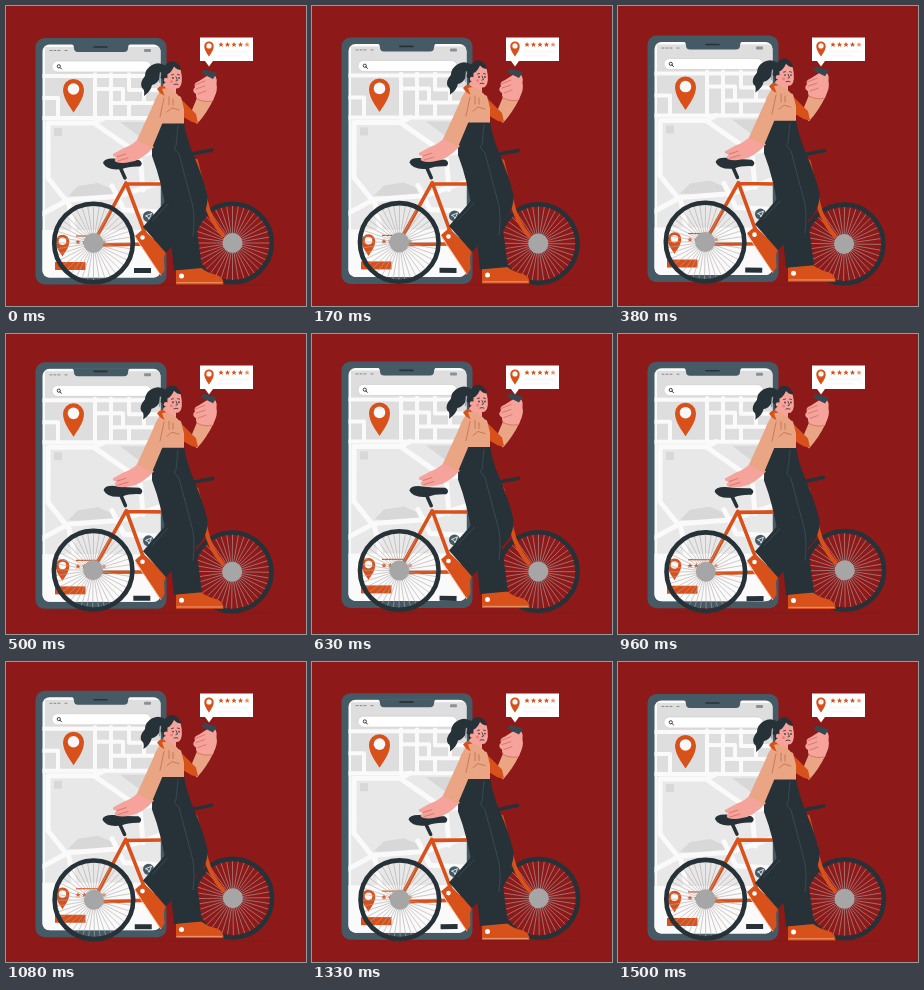
Write an HTML page that moves like this. It is 300 px wide and 300 px high and loops after 1.54 s.

```html
<!DOCTYPE html>
<html lang="en">
<head>
<meta charset="utf-8">
<title>Bike and phone</title>
<style>
html, body { margin: 0; height: 100%; overflow: hidden; background: #8d1919; }
svg { display: block; width: 100%; height: 100%; }
.o { fill: #d8501a; } .d { fill: #263238; } .w { fill: #fff; }
.skin { fill: #f5a39b; } .peach { fill: #e9a584; }
.line { fill: none; stroke-linecap: round; stroke-linejoin: round; }
</style>
</head>
<body>
<svg viewBox="0 0 300 300">
  <defs>
    <clipPath id="screen"><rect x="36.500" y="38.500" width="118" height="233" rx="7"/></clipPath>
    <g id="pin">
      <path class="o" d="M0 0C-3-5-10.500-14-10.500-23A10.500 10.500 0 0 1 10.500-23C10.500-14 3-5 0 0Z"/>
      <circle cy="-23.500" r="5.800" fill="#f8f8f8"/>
    </g>
    <path id="star" d="M0-2.600L.8-.8 2.600-.7 1.200.5 1.700 2.400 0 1.300-1.700 2.400-1.200.5-2.600-.7-.8-.8Z"/>
    <g id="wheel">
      <path class="spokes line" stroke="#b0a8a7" stroke-width=".6"/>
      <circle r="39.300" fill="none" stroke="#263238" stroke-width="4.600"/>
    </g>
  </defs>

  <path d="M45 279H262" stroke="#7f181a" stroke-width=".6"/>

  <g id="phone">
    <rect x="29.500" y="32" width="131" height="246.500" rx="9" fill="#455a64"/>
    <g clip-path="url(#screen)">
      <path fill="#fafafa" d="M36 38H155V272H36Z"/>
      <path fill="#dedede" d="M39 41H155V112H39Z"/>
      <path fill="#e8e8e8" d="M39 112H155V238H39Z"/>
      <path fill="#d8d8d8" d="M48 122H56V130H48ZM62 190L72 180 92 177 108 184 112 192ZM114 116H155V130L138 134Z"/>
      <g class="line" stroke="#fafafa" stroke-width="4">
        <path d="M36 70H155M89 68V112M105 68V112M89 83H117V96M105 97H155M123 68V84H155M123 97V112M36 112H155M36 92H52V112M138 84V97"/>
        <path stroke-width="5" d="M42 172V117H88L134 149 155 144M42 172L62 197M36 208L62 194 114 190 155 176M88 117L98 112M134 149L137 184M62 194L70 232M106 180L118 204 155 206"/>
      </g>
      <path fill="#fafafa" d="M36 224H155V272H36Z"/>
    </g>
    <path fill="#455a64" d="M66 38H124Q122 39 122 42 122 46 118 46H72Q68 46 68 42 68 39 66 38Z"/>
    <path class="line" d="M88 41H101" stroke="#263238" stroke-width="1.600"/>
    <path class="line" d="M44 44.500H55M59 44.500H61" stroke="#888" stroke-dasharray="2 2"/>
    <rect x="138" y="43" width="7" height="3" rx="1" fill="#8b9195"/>
    <rect x="46" y="55" width="99" height="11" rx="5.500" class="w" stroke="#c8c8c8" stroke-width=".6"/>
    <path class="line" d="M54 61.500L55.500 63" stroke="#263238"/>
    <circle cx="52.800" cy="60.300" r="1.600" fill="none" stroke="#263238" stroke-width=".9"/>
    <use href="#pin" x="67.500" y="106.500"/>
    <circle cx="142.500" cy="210.500" r="5.500" fill="#455a64"/>
    <path d="M139.500 210L145.500 207.500 143 213.500 142 211Z" fill="none" stroke="#fff" stroke-width=".8"/>
    <use href="#pin" transform="translate(56.500 250.500) scale(.65)"/>
    <g class="o rating" data-x="72" data-y="236"></g>
    <path class="o" d="M49 256H79.500V264H49Z"/>
    <path d="M70 230H92" stroke="#d8501a" stroke-width="1.200"/>
  </g>

  <g id="bike">
    <path class="line" d="M88 236L120 177L143 238L96 239M120 178H193M145 238L198 183" stroke="#d8501a" stroke-width="3.600"/>
    <use href="#wheel" x="87.500" y="237"/>
    <use href="#wheel" x="226.500" y="237"/>
    <path class="line" d="M190 155L200 196Q204 214 217 229" stroke="#d8501a" stroke-width="4.200"/>
    <circle cx="87.500" cy="237" r="10" fill="#a6a6a6"/>
    <circle cx="226.500" cy="237" r="10" fill="#a6a6a6"/>
    <path class="line" d="M114 161L119 172M188 147.500L206 144" stroke="#263238" stroke-width="3.500"/>
    <path class="d" d="M97 157Q98 152 108 152.500Q120 154 133 154Q138 157 134 160.500Q123 160 116 163Q101 165 97 157Z"/>
    <path class="d" d="M128 262H145V267H128Z"/>
  </g>

  <g>
    <path class="w" d="M194 31.500H247V55H207L203 60.500 199 55H194Z"/>
    <use href="#pin" transform="translate(203 50.500) scale(.45)"/>
    <g class="o rating" data-x="215" data-y="38.500"></g>
    <path d="M212 45.500H243M212 49.500H236" stroke="#f8f8f8" stroke-width="2"/>
  </g>

  <g id="woman">
    <path id="hair" class="d" d="M160 60Q153 55 146 59Q139 63 139 70Q133 77 136 82Q139 83 138 90Q145 85 146 79Q151 78 154 72L161 75Z"/>
    <path class="skin" d="M160 72H170V88L162 90 156 82Z"/>
    <path class="skin" d="M160 64Q167 56 174.500 63Q178 78 173 82Q164 85 159 76Z"/>
    <path class="d" d="M157 78Q154 61 163 56Q171 53 175.500 64Q171 64 168 60.500Q165 67 161.500 68Q162 73 160 76Z"/>
    <path class="line" d="M154.500 67L153.500 76" stroke="#9aa5aa" stroke-width="1.500"/>
    <circle class="skin" cx="160" cy="74" r="2.200"/>
    <g class="line" stroke="#263238" stroke-width=".8">
      <path d="M165.500 69L167.500 68.500M171.500 68.500L173.500 69M170 71L171.500 74.500 170 75M168 78.500Q170 77.500 172 78.500"/>
      <path stroke-width="1.500" d="M167 71.800V72.200M173 71.800V72.200"/>
    </g>
    <circle cx="165.500" cy="75.500" r="1.500" fill="#ec8078"/>

    <path class="skin" d="M187 104Q193 96 190 88Q185 85 189 81Q187 77 193 75L204 68Q212 68 210.500 78Q212 84 208 92L203 101Z"/>
    <path class="peach" d="M183 111L191 92Q199 95 207 94Q201 107 191 118Z"/>
    <path class="skin" d="M191 93Q188 86 194 84L210 82 207 95Q199 96 191 93Z"/>
    <path fill="#37474f" d="M195 67L198 63.500 211 67 207 73Z"/>
    <path class="line" d="M190 83L199 80M189 79L199 75M192 88L200 85M191 93Q199 97 206 95" stroke="#c9685e" stroke-width=".7"/>
    <path class="o" d="M174 92L190 108 192 117 186 116 174 109Z"/>

    <path class="o" d="M129 230L137 223 160 245 158 252 158.500 264 155 270Z"/>
    <path class="line" d="M129.500 232L154.500 269" stroke="#f5c3a8" stroke-width="1"/>
    <circle class="w" cx="136.500" cy="231.500" r="2.300"/>
    <path class="d" d="M164 190L137 221 160 247 190 213Z"/>
    <path class="o" d="M170 264L194 261Q201 267 211 269Q218 272 217.500 278.500H170Z"/>
    <path class="line" d="M171 276.800H216" stroke="#f0b08a" stroke-width=".8"/>
    <circle class="w" cx="175.500" cy="270" r="2.500"/>
    <path class="d" d="M154 116H178Q180 131 188 150Q198 174 201.500 190Q202 207 190 217L196 262 168 264.500Q166 238 161 211Q156 176 146 150Q145 133 154 116Z"/>
    <path class="line" d="M172 120L170 140Q166 141 173 148L187 201Q189 214 187 230M162 198L146 215" stroke="#455a64" stroke-width=".6"/>

    <path class="peach" d="M157 82Q168 87 175 91L178 103 178 117.500H153L155 103Z"/>
    <path class="skin" d="M133 132Q127 139 118 142L107 148Q106 151 111 151Q107 154 110 156Q116 158 124 156Q135 155 148 141Z"/>
    <path class="line" d="M111 151L120 148M112 155L122 152" stroke="#c9685e" stroke-width=".7"/>
    <path class="peach" d="M158 82Q151 87 147 99L131 134 146 142 159 111Z"/>
    <path class="o" d="M151 83Q156 77 160 82L171 91 169 96 154 87Z"/>
    <path class="peach" d="M156 83Q163 80 172 89L172 98 159 91Z"/>
    <path class="line" d="M158 92L154 111M163 91V99M167 93V99M161 106L166 102 173 104" stroke="#b86a48" stroke-width=".7"/>
  </g>
</svg>
<script>
const LOOP = 1540;
const byId = id => document.getElementById(id);
const phone = byId('phone'), woman = byId('woman'), bike = byId('bike'), hair = byId('hair');

const SPOKES = 40;
let spokes = '';
for (let i = 0; i < SPOKES; i++) {
  const a = i * 2 * Math.PI / SPOKES, x = Math.cos(a), y = Math.sin(a);
  spokes += `M${x * 9} ${y * 9}L${x * 38} ${y * 38}`;
}
document.querySelector('.spokes').setAttribute('d', spokes);

for (const row of document.querySelectorAll('.rating')) {
  for (let i = 0; i < 5; i++) {
    const x = +row.dataset.x + i * 6.5, y = row.dataset.y;
    row.innerHTML += `<use href="#star" x="${x}" y="${y}" opacity="${i < 4 ? 1 : .65}"/>`;
  }
}

const lift = angle => (1 - Math.cos(angle)) / 2;

function draw() {
  const angle = performance.now() % LOOP / LOOP * 2 * Math.PI;
  const bodyLift = lift(angle + .25);
  phone.setAttribute('transform', `translate(0 ${-5 * lift(angle)})`);
  woman.setAttribute('transform', `translate(0 ${-4.6 * bodyLift})`);
  hair.setAttribute('transform', `rotate(${2.5 * bodyLift} 158 66)`);
  bike.setAttribute('transform', `rotate(${.75 * Math.sin(angle)} 157 205)`);
  requestAnimationFrame(draw);
}
draw();
</script>
</body>
</html>
```
